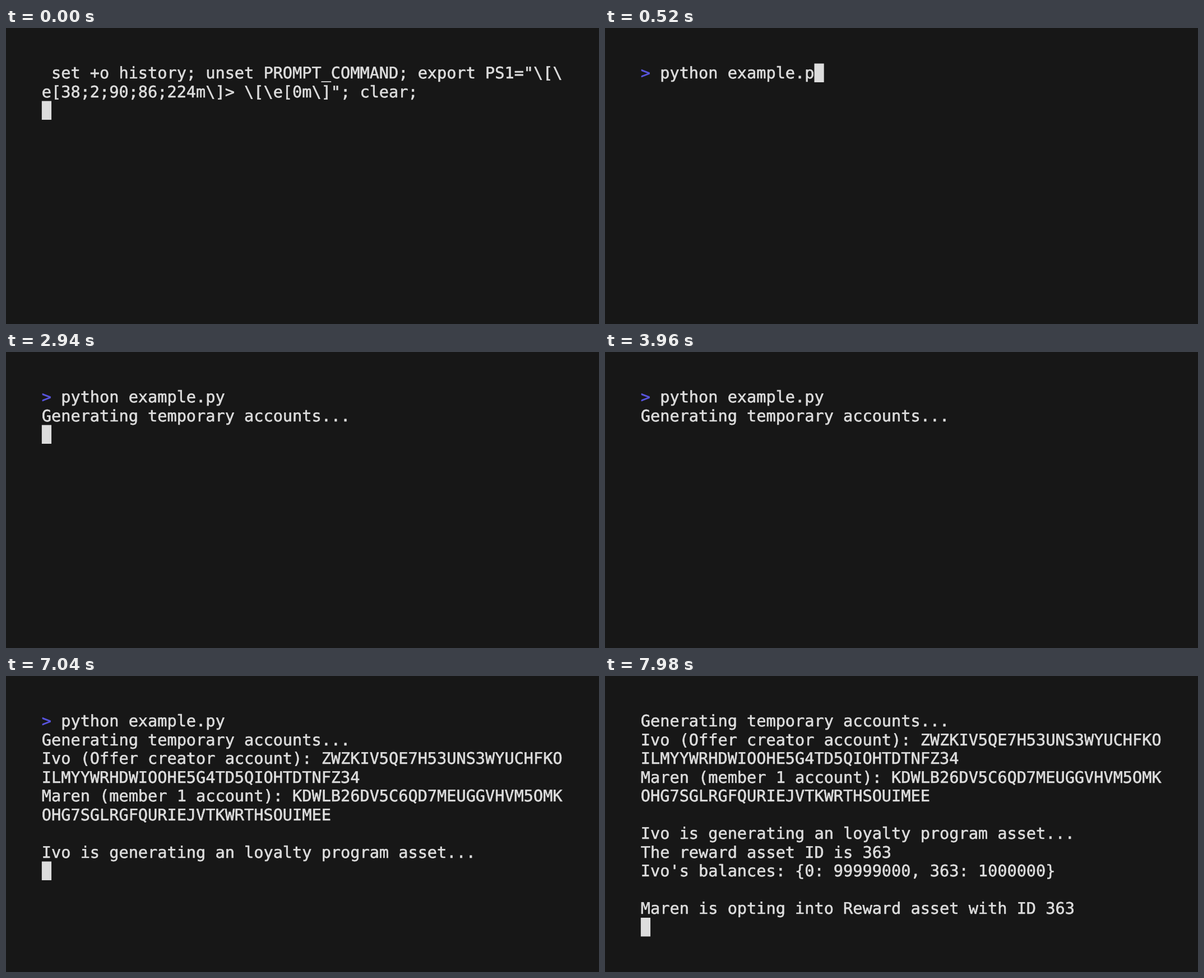
An HTML page with a canvas that plays this animation: 1058 by 529 pixels, repeating every 8000 ms.

```html
<!DOCTYPE html>
<html lang="en">
<head>
<meta charset="utf-8">
<title>Terminal session</title>
<style>
  html, body { margin: 0; width: 100%; height: 100%; overflow: hidden; background: #171717; }
  canvas { display: block; }
</style>
</head>
<body>
<canvas id="stage" width="1058" height="529"></canvas>
<script>
const ctx = document.getElementById("stage").getContext("2d");

const LOOP = 8000;
const ROWS = 12;
const CELL = { x: 63.85, y: 63.5, w: 17.2, h: 33.5, baseline: 26.6 };
const COLOR = { back: "#171717", text: "#dddddd", prompt: "#5a56e0" };
const EXTRA_WEIGHT = 0.6;

const SETUP = [
  ' set +o history; unset PROMPT_COMMAND; export PS1="\\[\\',
  'e[38;2;90;86;224m\\]> \\[\\e[0m\\]"; clear;',
  ""
];
const COMMAND = "python example.py";
const TYPE_START = 60;
const TYPE_STEP = 30;
const TICK = 20;

// Each block of output ends with the empty line that holds the cursor.
const OUTPUT = [
  { at: 580, lines: [] },
  { at: 940, lines: ["Generating temporary accounts..."] },
  { at: 4780, lines: [
    "Ivo (Offer creator account): ZWZKIV5QE7H53UNS3WYUCHFKO",
    "ILMYYWRHDWIOOHE5G4TD5QIOHTDTNFZ34",
    "Maren (member 1 account): KDWLB26DV5C6QD7MEUGGVHVM5OMK",
    "OHG7SGLRGFQURIEJVTKWRTHSOUIMEE",
    "",
    "Ivo is generating an loyalty program asset..."
  ] },
  { at: 7960, lines: ["The reward asset ID is 363"] },
  { at: 7980, lines: [
    "Ivo's balances: {0: 99999000, 363: 1000000}",
    "",
    "Maren is opting into Reward asset with ID 363"
  ] }
];

// The cursor toggles at these times and is shown again by new output.
const BLINKS = [
  920,
  1260, 1600, 1940, 2280, 2600, 2940, 3280, 3620, 3960, 4300, 4640,
  5060, 5360, 5640, 5920, 6220, 6480, 6760, 7040, 7340, 7620, 7900
];

function screenLines(t) {
  if (t < 40) return SETUP;
  const now = Math.floor(t / TICK) * TICK;
  const typed = Math.max(0, Math.floor((now - TYPE_START) / TYPE_STEP) + 1);
  const lines = ["> " + COMMAND.slice(0, typed)];
  const shown = OUTPUT.filter(block => t >= block.at);
  for (const block of shown) lines.push(...block.lines);
  if (shown.length) lines.push("");
  return lines.slice(-ROWS);
}

function cursorVisible(t) {
  const since = OUTPUT.reduce((last, block) => t >= block.at ? block.at : last, 0);
  return BLINKS.filter(b => b > since && b <= t).length % 2 === 0;
}

function drawLine(line, row) {
  const y = CELL.y + row * CELL.h + CELL.baseline;
  const hasPrompt = line.startsWith("> ");
  for (let i = 0; i < line.length; i++) {
    const x = CELL.x + i * CELL.w;
    const color = hasPrompt && i === 0 ? COLOR.prompt : COLOR.text;
    ctx.fillStyle = ctx.strokeStyle = color;
    ctx.fillText(line[i], x, y);
    ctx.strokeText(line[i], x, y);
  }
}

function draw(t) {
  ctx.fillStyle = COLOR.back;
  ctx.fillRect(0, 0, 1058, 529);
  ctx.font = '28.55px "DejaVu Sans Mono", monospace';
  ctx.textBaseline = "alphabetic";
  ctx.textRendering = "geometricPrecision";
  ctx.lineWidth = EXTRA_WEIGHT;
  ctx.lineJoin = "round";

  const lines = screenLines(t);
  lines.forEach(drawLine);

  if (cursorVisible(t)) {
    const row = lines.length - 1;
    ctx.fillStyle = COLOR.text;
    ctx.fillRect(CELL.x + lines[row].length * CELL.w, CELL.y + row * CELL.h, CELL.w, CELL.h);
  }
}

let start = null;
function frame(now) {
  if (start === null) start = now;
  draw(Math.max(0, now - start) % LOOP);
  requestAnimationFrame(frame);
}
draw(0);
requestAnimationFrame(frame);
</script>
</body>
</html>
```
